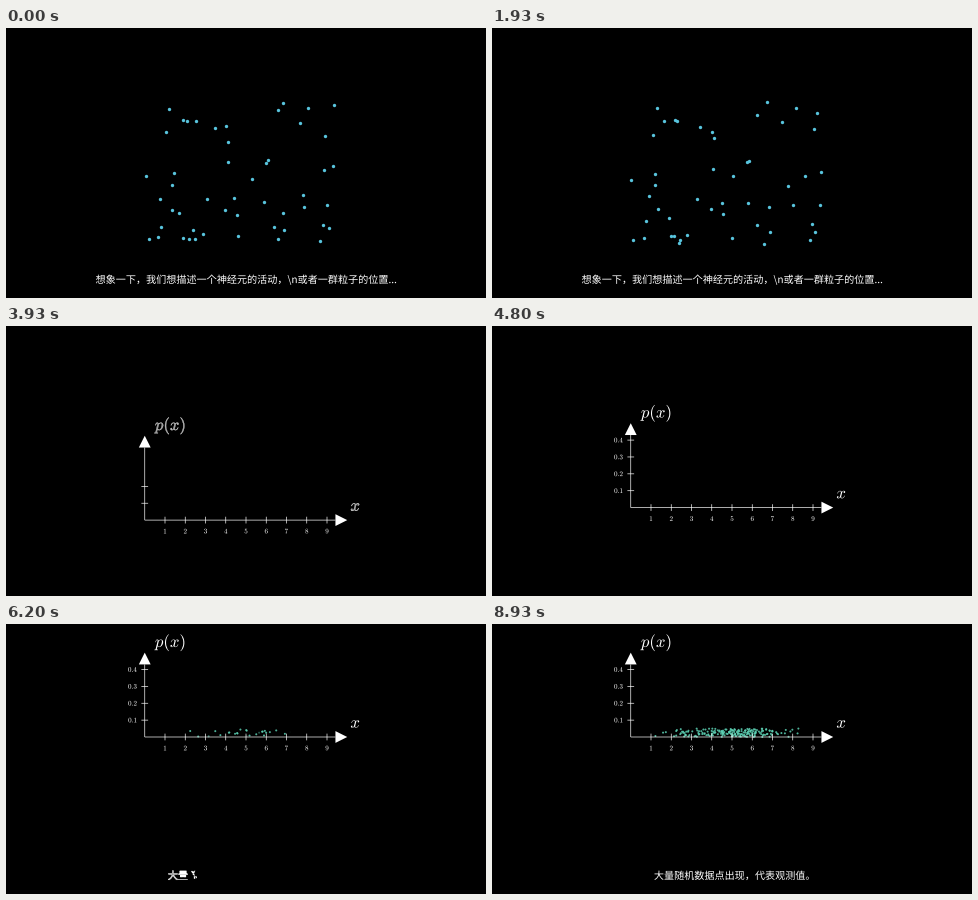
Animation of 480x270 px, one loop 9000 ms. Source, as a matplotlib script:

```python
import numpy as np
import matplotlib.pyplot as plt
from matplotlib.animation import FuncAnimation
from matplotlib.patches import PathPatch
from matplotlib.path import Path
from matplotlib.textpath import TextPath
from matplotlib.transforms import Affine2D

W, H, DPI = 480, 270, 60
FPS, STEPS = 15, 135
PT = 72 / DPI                      # points per pixel
UNIT = H / 8                       # pixels per scene unit
BLUE, TEAL = (0.345, 0.769, 0.867), (0.361, 0.816, 0.702)
STROKE = 0.02 * UNIT * PT
LABEL, TICK_LABEL, CAPTION = 16.8, 7, 10.1      # font sizes in pixels
BASELINE = 255.1

plt.rcParams["font.family"] = "Noto Sans CJK JP"
plt.rcParams["mathtext.fontset"] = "cm"

# Timeline, in steps of 1/15 s
FADE, BUILD, RAISE, SAMPLE = 29, 46, 67, 89

# Axes in their raised position
AXIS_W, AXIS_H = 6 * UNIT, 2.5 * UNIT
OX, OY, DROP = (W - AXIS_W) / 2, 113.0, 81.1
DX, DY = AXIS_W / 10, AXIS_H / 5
TICK, TIP = 0.1 * UNIT, 0.35 * UNIT

fig = plt.figure(figsize=(W / DPI, H / DPI), dpi=DPI, facecolor="black")
ax = fig.add_axes([0, 0, 1, 1])
ax.set(xlim=(0, W), ylim=(H, 0))
ax.axis("off")

lift = Affine2D()
moving = lift + ax.transData


def smooth(a):
    a = np.clip(a, 0, 1)
    edge = 1 / (1 + np.exp(5))
    return np.clip((1 / (1 + np.exp(5 - 10 * a)) - edge) / (1 - 2 * edge), 0, 1)


def place(text, size, x, y, centred=True, baseline=False):
    raw = TextPath((0, 0), text, size=size)
    box = raw.get_extents()
    dx = x - (box.x0 + box.x1) / 2 if centred else x
    dy = y if baseline else y + (box.y0 + box.y1) / 2
    return raw.transformed(Affine2D().scale(1, -1).translate(dx, dy))


def solid(path, transform):
    return ax.add_patch(PathPatch(path, fc="white", lw=0, snap=False,
                                  transform=transform))


def line(x0, y0, x1, y1):
    return ax.plot([x0, x1], [y0, y1], color="white", lw=STROKE, snap=False,
                   solid_capstyle="butt", transform=moving)[0]


def triangle(*points):
    return solid(Path([*points, points[0]]), moving)


def number(text, x, y):
    return solid(place(f"${text}$", TICK_LABEL, x, y), moving)


def circles(points, radius, color):
    return ax.scatter(*points.T, s=(2 * radius * PT) ** 2, color=[color], linewidths=0)


def lagged(a, count, lag):
    """Local progress of each of count staggered parts."""
    return a * (1 + (count - 1) * lag) - lag * np.arange(count)


class Written:
    """A shape whose border is traced first and filled afterwards."""

    def __init__(self, path, transform):
        loops = [Path(p).interpolated(8).vertices for p in path.to_polygons()]
        self.verts = np.concatenate(loops)
        self.codes = np.concatenate(
            [[Path.MOVETO] + [Path.LINETO] * (len(p) - 1) for p in loops])
        self.fill = solid(path, transform)
        self.edge = ax.add_patch(PathPatch(path, fill=False, ec="white", snap=False,
                                           transform=transform))

    def show(self, a):
        a = min(max(a, 0), 1)
        k = int(len(self.verts) * min(2 * a, 1))
        filled = max(2 * a - 1, 0)
        self.fill.set_alpha(filled)
        self.edge.set_visible(k > 1 and a < 1)
        if k > 1:
            self.edge.set_path(Path(self.verts[:k], self.codes[:k]))
        self.edge.set_linewidth(STROKE * (1 - filled))


# Particles on a random walk
rng = np.random.default_rng(12)
begin = rng.uniform((139, 64), (338, 219), (50, 2))
walk = np.cumsum(rng.normal(0, 0.7, (FADE + 1, *begin.shape)), axis=0)
walk -= walk[0]
particles = circles(begin, 0.05 * UNIT, BLUE)
intro = solid(place("想象一下，我们想描述一个神经元的活动，\\n或者一群粒子的位置...",
                    CAPTION, W / 2, BASELINE, baseline=True), ax.transData)

# Axes, listed in the order in which the parts appear
right, top, half = OX + AXIS_W, OY - AXIS_H, TIP / 2
xs = [(k, OX + k * DX) for k in range(1, 10)]
ys = [(k, OY - k * DY) for k in range(1, 5)]
parts = [line(OX, OY, right - TIP, OY),
         triangle((right - TIP, OY - half), (right, OY), (right - TIP, OY + half))]
parts += [line(x, OY - TICK, x, OY + TICK) for _, x in xs]
parts += [number(k, x, OY + 11) for k, x in xs]
parts += [line(OX, OY, OX, top + TIP),
          triangle((OX - half, top + TIP), (OX, top), (OX + half, top + TIP))]
parts += [line(OX - TICK, y, OX + TICK, y) for _, y in ys]
parts += [number(f"0.{k}", OX - 12.3, y) for k, y in ys]
labels = [Written(place("$p(x)$", LABEL, OX + 24.6, top - 9.9), moving),
          Written(place("$x$", LABEL, right + 7.8, OY - 13), moving)]

# Normally distributed samples just above the x axis
count = 200
samples = np.column_stack([OX + DX * rng.normal(5, 1.5, count),
                           OY - DY * rng.uniform(0, 0.5, count)])
sample_dots = circles(samples, 0.03 * UNIT, TEAL)
sample_rgba = np.tile([*TEAL, 1.0], (count, 1))

caption = [Written(place(c, CAPTION, 161.9 + CAPTION * i, BASELINE, centred=False,
                         baseline=True), ax.transData)
           for i, c in enumerate("大量随机数据点出现，代表观测值。")]


def draw(n):
    visible = 1 - smooth((n - FADE) / FPS)
    particles.set_offsets(begin + walk[min(n, FADE)])
    particles.set_alpha(visible)
    intro.set_alpha(visible)

    built = (n - BUILD) / FPS
    for i, part in enumerate(parts):
        part.set_visible(built * len(parts) > i)
    for label in labels:
        label.show(built)
    lift.clear().translate(0, DROP * (1 - smooth((n - RAISE) / FPS)))

    a = min(max((n - SAMPLE) / (2 * FPS), 0), 1)
    sample_rgba[:, 3] = 0.85 * smooth(lagged(a, count, 0.1))
    sample_dots.set_facecolors(sample_rgba)
    for glyph, local in zip(caption, lagged(a, len(caption), 0.2)):
        glyph.show(local)
    return []


anim = FuncAnimation(fig, draw, frames=STEPS, interval=1000 / FPS,
                     repeat=True, repeat_delay=0, blit=False)
plt.show()
```
